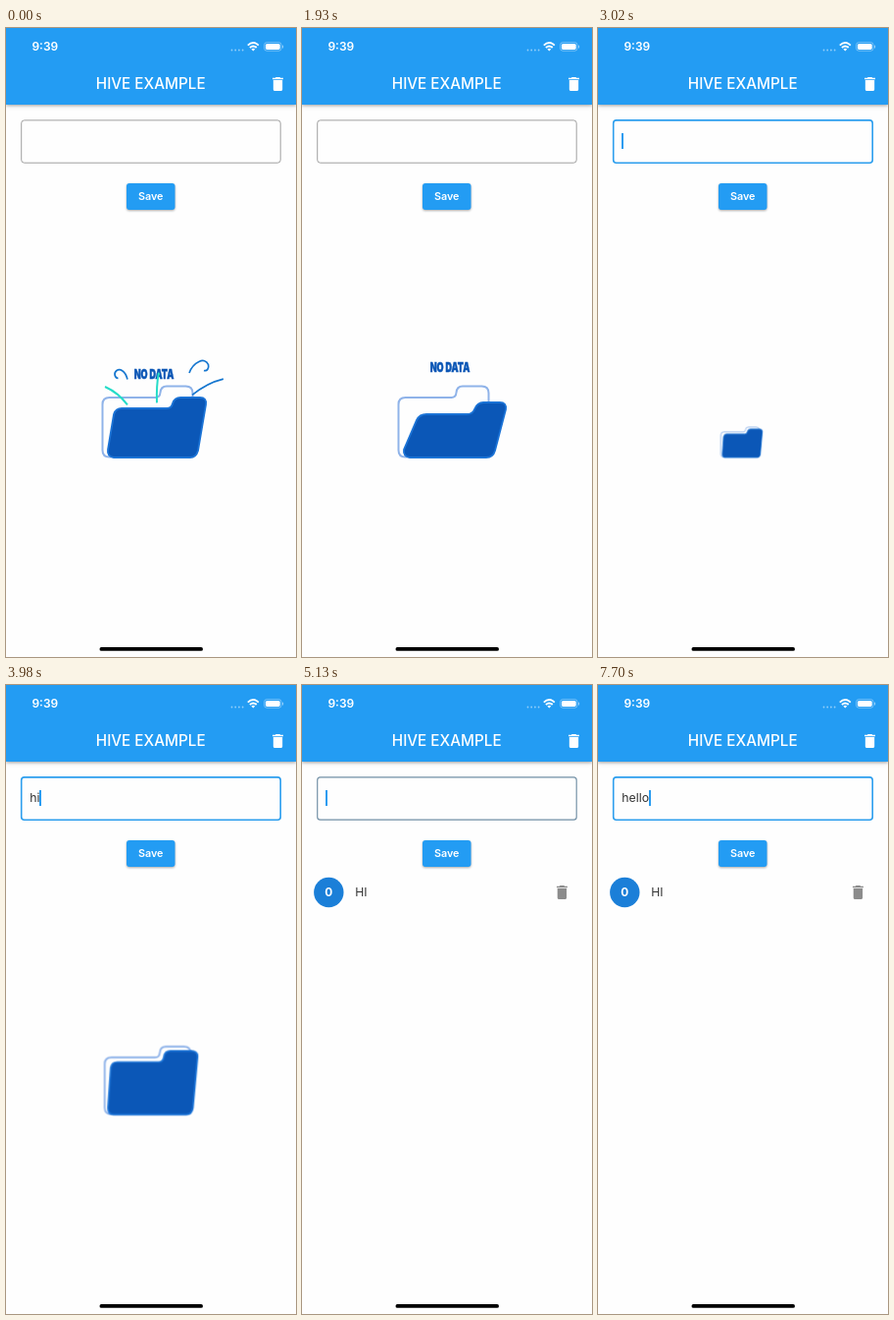
Recreate the animation shown at these times as an HTML page. Size 296x640 px, loop 8 s.

```html
<!DOCTYPE html>
<html lang="en">
<head>
<meta charset="utf-8">
<title>Hive example</title>
<style>
  html, body { margin: 0; width: 100%; height: 100%; overflow: hidden; background: #fefefe; }
  body { position: relative; font-family: Inter, Roboto, sans-serif; }
  svg { position: absolute; left: 0; top: 0; width: 296px; height: 640px; }

  /* One loop is 8 s, so 1% is 80 ms. */
  .anim, .typed::before, .typed::after { animation: 8s linear infinite; }
  .cut { animation-timing-function: step-end; }

  .bar { fill: #239cf3; filter: drop-shadow(0 1.6px 1.6px #0004) drop-shadow(0 1px 2.5px #0002); }
  .button { fill: #239cf3; filter: drop-shadow(0 1px 1px #0005); animation-name: press; }
  .ripple { fill: #fff; animation-name: ripple; }
  .field { fill: none; stroke: #a0a0a0; animation-name: focus; }

  .typed { position: absolute; left: 24.3px; top: 104.8px; height: 20px; display: flex;
    align-items: center; font-size: 12.3px; color: #333; }
  .typed::before { content: ""; margin-bottom: 1.6px; animation-name: type; animation-timing-function: step-end; }
  .typed::after { content: ""; width: 1.8px; height: 16.5px; margin-left: -.5px; background: #2a9cf0; animation-name: blink; }

  .empty { animation-name: empty; }
  .list { animation-name: list; }
  .folder { transform-origin: 145.4px 437px; animation-name: zoom; }
  .back { fill: none; stroke: #8fb3e9; stroke-width: 2; transform-origin: 98px 437px; animation-name: settle; }
  .front { fill: #0b57b7; stroke: #1b73d6; stroke-width: 1.8; animation-name: flap; }
  .label { fill: #0b56b5; stroke: #0b56b5; stroke-width: .5; animation-name: label; }
  .label text { font-weight: 900; font-size: 13.3px; transform: scaleX(.68); }
  .rays { fill: none; stroke: #1576cf; stroke-width: 1.7; }
  .rays path { stroke-dasharray: 70 300; animation-name: burst; }
  .rays .curl { stroke-dasharray: 100 300; }
  .rays .mint { stroke: #25dcc8; stroke-width: 2; }

  @keyframes focus {
    0%, 25.2% { stroke: #a0a0a0; stroke-width: 1px; }
    27%, 58.6% { stroke: #2c9eee; stroke-width: 1.6px; }
    60.8%, 63.6% { stroke: #8a8a8a; stroke-width: 1px; }
    65.6%, 100% { stroke: #2c9eee; stroke-width: 1.6px; }
  }
  @keyframes type {
    0% { content: ""; }
    42.375% { content: "h"; }
    45.75% { content: "hi"; }
    58.6% { content: ""; }
    73.5% { content: "h"; }
    76.375% { content: "he"; }
    79.5% { content: "hel"; }
    81.25% { content: "hell"; }
    84.25%, 100% { content: "hello"; }
  }
  @keyframes blink {
    0%, 25.6% { opacity: 0; }
    25.75%, 33.8% { opacity: 1; }
    34.9%, 36.9% { opacity: 0; }
    37.6%, 52.2% { opacity: 1; }
    53.2%, 63.9% { opacity: 0; }
    64.1%, 69.4% { opacity: 1; }
    70.6%, 73.4% { opacity: 0; }
    73.5%, 90.7% { opacity: 1; }
    92.2%, 95% { opacity: 0; }
    96.2%, 100% { opacity: 1; }
  }
  @keyframes press {
    0%, 54.6%, 61.4%, 100% { fill: #239cf3; filter: drop-shadow(0 1px 1px #0005); }
    55.8%, 58.6% { fill: #3da6f4; filter: drop-shadow(0 3px 2.5px #0006); }
  }
  @keyframes ripple {
    0%, 54.8% { r: 2px; opacity: 0; }
    55% { r: 3px; opacity: .25; }
    55.875% { r: 11px; opacity: .25; }
    58.6% { r: 38px; opacity: .2; }
    61.3%, 100% { r: 46px; opacity: 0; }
  }
  @keyframes empty {
    0% { visibility: visible; }
    58.6%, 100% { visibility: hidden; }
  }
  @keyframes list {
    0% { visibility: hidden; }
    58.6%, 100% { visibility: visible; }
  }
  @keyframes zoom {
    0%, 34.2% { transform: scale(1); }
    37.75% { transform: scale(.43); }
    39.3%, 45% { transform: scale(0); }
    50%, 100% { transform: scale(1); }
  }
  @keyframes settle {
    0%, 50%, 58.6%, 100% { transform: none; }
    54.25% { transform: skewX(-3.4deg) scaleY(.92); }
    55.875% { transform: skewX(-2.4deg) scaleY(.945); }
  }
  @keyframes flap {
    0%, 58.6%, 100% { d: path("M110 437Q103 436 104 429L110 393Q112 387 118 387L164 387Q169 387 170 382Q172 376 178 376L198 376Q205 376 204 383L196 430Q194 437 188 437Z"); }
    3.1%, 34.2%, 57% { d: path("M110 437Q103 436 104 429L117 399Q120 393 127 393L168 393Q174 393 176 388Q179 381 185 381L202 381Q209 381 208 388L197 430Q195 437 188 437Z"); }
    37.4%, 50% { d: path("M108 437Q102 437 102 430L105 387Q106 381 112 381L156 381Q161 381 162 375Q163 369 169 369L191 369Q198 369 198 375L193 430Q192 437 186 437Z"); }
  }
  @keyframes label {
    0% { transform: translateY(7px); opacity: 1; animation-timing-function: ease-out; }
    6%, 24% { transform: none; opacity: 1; animation-timing-function: ease-in-out; }
    28.75%, 30.4% { transform: translateY(34.5px); opacity: 1; }
    31.9%, 54.3% { transform: translateY(36px); opacity: 0; }
    55.875% { transform: translateY(31.5px); opacity: 1; }
    58.6%, 100% { transform: translateY(10px); opacity: 1; }
  }
  @keyframes burst {
    0% { stroke-dashoffset: 0; }
    3.1% { stroke-dashoffset: -55; }
    10%, 100% { stroke-dashoffset: -101; }
  }
</style>
</head>
<body>
<svg viewBox="0 0 296 640">
  <defs>
    <path id="bin" transform="scale(.78) translate(-12 -12)"
      d="M6 19c0 1.1.9 2 2 2h8c1.1 0 2-.9 2-2V7H6zM19 4h-3.5l-1-1h-5l-1 1H5v2h14z"/>
    <clipPath id="edge"><rect x="123" y="158" width="49.5" height="27" rx="3"/></clipPath>
  </defs>

  <rect class="bar" width="296" height="78"/>
  <g fill="#fff">
    <text x="26.4" y="23.2" font-size="12" font-weight="600">9:39</text>
    <g opacity=".5">
      <circle cx="230.5" cy="22.5" r=".9"/><circle cx="234.2" cy="22.5" r=".9"/>
      <circle cx="237.9" cy="22.5" r=".9"/><circle cx="241.6" cy="22.5" r=".9"/>
    </g>
    <g fill="none" stroke="#fff" stroke-width="1.9">
      <path d="M246.8 17.6Q252.3 12.6 257.8 17.6"/>
      <path d="M248.9 20Q252.3 17 255.7 20"/>
    </g>
    <path d="M250.4 21.4Q252.3 20 254.2 21.4L252.3 23.6Z"/>
    <rect x="263.6" y="14.6" width="17.4" height="8.6" rx="2.6" fill="none" stroke="#fff" stroke-width=".8" opacity=".45"/>
    <rect x="264.9" y="15.9" width="14.8" height="6" rx="1.6"/>
    <rect x="282" y="17.4" width="1.1" height="3" rx=".5" opacity=".5"/>
    <text x="147.7" y="62.4" font-size="15.25" font-weight="500" text-anchor="middle">HIVE EXAMPLE</text>
    <use href="#bin" x="277.5" y="57"/>
  </g>

  <rect class="field anim" x="15.7" y="93.9" width="264.5" height="43.3" rx="3"/>

  <rect class="button anim" x="123" y="158" width="49.5" height="27" rx="3"/>
  <g clip-path="url(#edge)"><circle class="ripple anim" cx="144.5" cy="159" r="2"/></g>
  <text x="147.7" y="175.2" font-size="10.8" font-weight="600" fill="#fff" text-anchor="middle">Save</text>

  <g class="empty anim cut">
    <g class="folder anim">
      <path class="back anim" d="M105.5 436.5Q98.5 436.5 98.5 429.5V383Q98.5 376 105.5 376H152.5Q157 376 157.5 371Q158 364.5 164 364.5H183.5Q190.5 364.5 190.5 371.5V429.5Q190.5 436.5 183.5 436.5Z"/>
      <path class="front anim" d="M110 437Q103 436 104 429L110 393Q112 387 118 387L164 387Q169 387 170 382Q172 376 178 376L198 376Q205 376 204 383L196 430Q194 437 188 437Z"/>
    </g>
    <g class="label anim"><g transform="translate(151 349.8)"><text text-anchor="middle">NO DATA</text></g></g>
    <g class="rays">
      <path class="anim mint" pathLength="100" d="M124 383.5Q111 366 89 361"/>
      <path class="anim mint" pathLength="100" d="M154 381.5C153.500 367 154 355 159 338"/>
      <path class="anim" pathLength="100" d="M190 373.5Q211 356 237 355"/>
      <path class="anim curl" pathLength="100" d="M124 357.5C121.5 348 116 346.5 113 348.5C109.5 351 111 356 114.5 356.5"/>
      <path class="anim curl" pathLength="100" d="M187 351C191 340 203 334 206.5 342.5C207.5 346.5 205 349.5 202 348.5"/>
    </g>
  </g>

  <g class="list anim cut">
    <circle cx="27.3" cy="211" r="15.2" fill="#1b7fd8"/>
    <text x="27.3" y="215.2" font-size="11.8" font-weight="700" fill="#fff" text-anchor="middle">0</text>
    <text x="54.3" y="215.2" font-size="12.2" fill="#333">HI</text>
    <use href="#bin" x="265.4" y="211" fill="#8c8c8c"/>
  </g>

  <rect x="95.5" y="630" width="105.5" height="3.8" rx="1.9"/>
</svg>
<div class="typed"></div>
</body>
</html>
```
